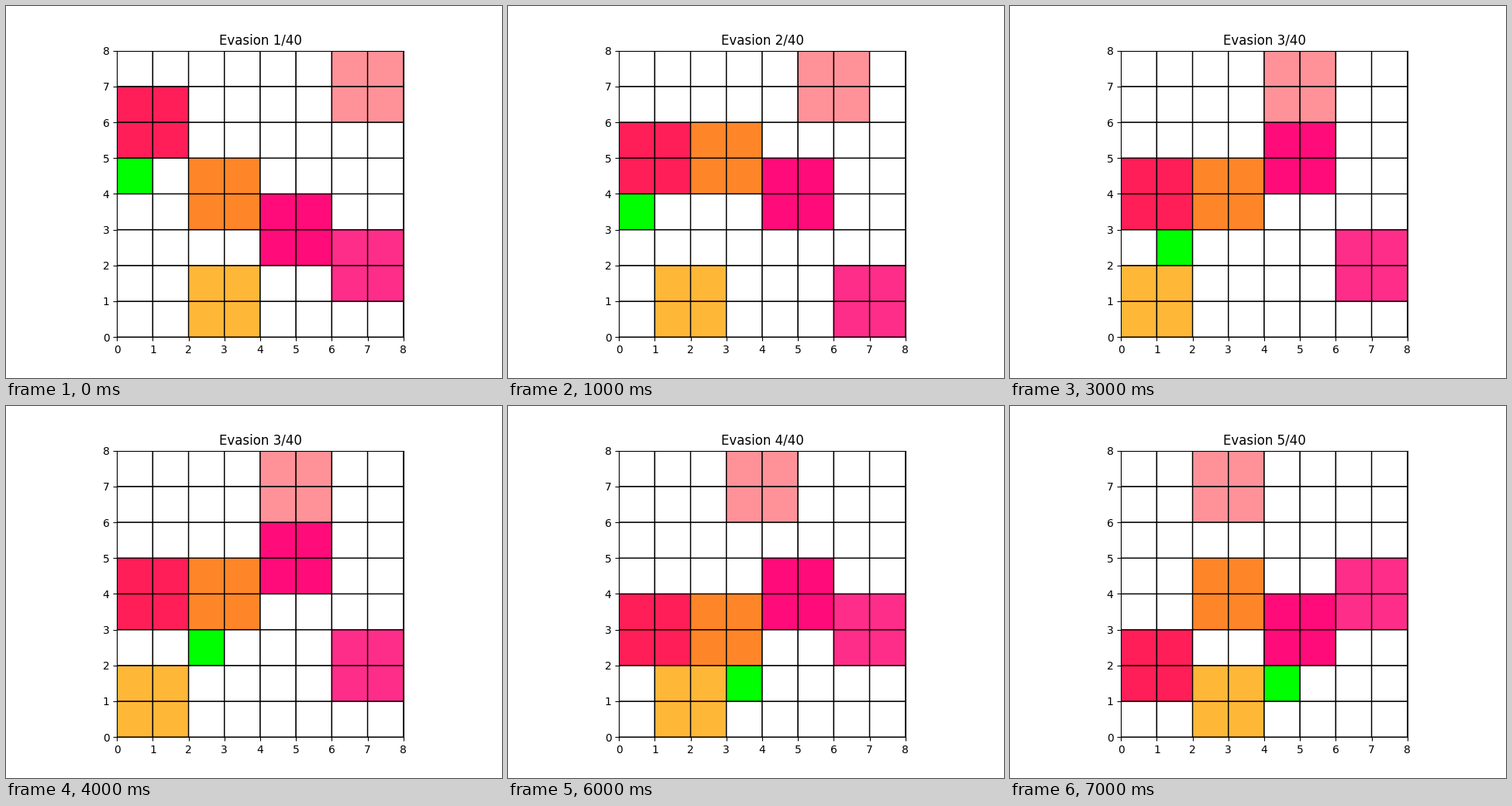
Write a matplotlib script that moves like this. It is 640 by 480 pixels and loops after 8000 ms.

```python
import numpy as np
import matplotlib.pyplot as plt
from matplotlib.animation import FuncAnimation
from matplotlib.colors import ListedColormap

SIZE = 8
TOTAL = 40
COLORS = ["#ffffff", "#00ff00", "#ff1e57", "#ff8628",
          "#ff0b7a", "#ff2d8a", "#ffb738", "#ff9298"]

# Game turn and player cell for each second
TURNS = [0, 1, 2, 2, 2, 2, 3, 4]
PLAYER = [(0, 4), (0, 3), (0, 2), (1, 2), (2, 2), (2, 1), (3, 1), (4, 1)]


def bounce(step, span):
    """Walk back and forth between 0 and span."""
    return span - abs(span - step % (2 * span))


def blocks(turn):
    """Lower left corners of the 2x2 blocks, in colour order."""
    return [
        (0, 5 - turn),
        (2, 2 + bounce(turn + 1, 2)),
        (4, 2 + bounce(turn, 2)),
        (6, bounce(turn - 1, 6)),
        (bounce(turn + 2, 2), 0),
        (6 - turn, 6),
    ]


def board(i):
    cells = np.zeros((SIZE, SIZE))
    for value, (x, y) in enumerate(blocks(TURNS[i]), start=2):
        cells[y:y + 2, x:x + 2] = value
    x, y = PLAYER[i]
    cells[y, x] = 1
    return cells


fig, ax = plt.subplots(figsize=(6.4, 4.8), dpi=100)
mesh = ax.pcolor(board(0), cmap=ListedColormap(COLORS), vmin=-0.5,
                 vmax=len(COLORS) - 0.5, edgecolors="k", linewidths=1)
ax.set_aspect("equal")
ax.set(xlim=(0, SIZE), ylim=(0, SIZE),
       xticks=range(SIZE + 1), yticks=range(SIZE + 1))
title = ax.set_title("")


def update(i):
    mesh.set_array(board(i))
    title.set_text(f"Evasion {TURNS[i] + 1}/{TOTAL}")
    return mesh, title


anim = FuncAnimation(fig, update, frames=len(TURNS), interval=1000,
                     repeat=True, repeat_delay=0)
plt.show()
```
